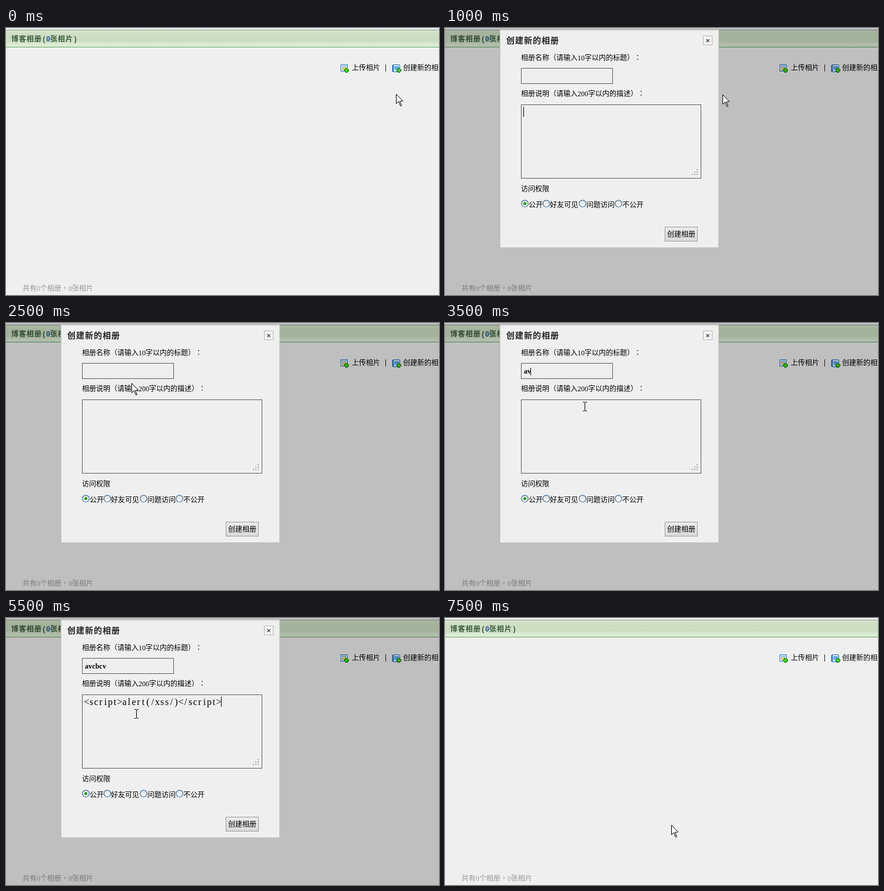
An HTML page with a canvas that plays this animation: 735x454 px, repeating every 8 s.

```html
<!DOCTYPE html>
<html lang="zh-CN">
<head>
<meta charset="utf-8">
<title>相册</title>
<style>
html, body { margin: 0; width: 100%; height: 100%; overflow: hidden; background: #efefef; }
canvas { display: block; }
</style>
</head>
<body>
<canvas id="stage" width="735" height="454"></canvas>
<script>
const ctx = document.getElementById('stage').getContext('2d');
const SONG = '"Liberation Serif", "Noto Sans CJK SC", "Noto Sans CJK", sans-serif';
const BOLD = '"Liberation Mono", "Noto Sans CJK SC", "Noto Sans CJK", sans-serif';
const MARK = '"Noto Sans CJK TC", "Noto Sans CJK", sans-serif';
const STEP = 500;
const CODE = '<script>alert(/xss/)<\/script>';

// One entry per half second.
const steps = [
  { cur: 'arrow', x: 662, y: 112 },
  { cur: 'hand', x: 680, y: 68, hover: true },
  { cur: 'arrow', x: 471, y: 113, name: '', caret: 'note' },
  { cur: 'beam', x: 185, y: 77, name: '' },
  { cur: 'beam', x: 184, y: 80, name: '', caret: 'name' },
  { cur: 'arrow', x: 213, y: 102, name: '' },
  { cur: 'arrow', x: 217, y: 101, name: 'a', caret: 'name' },
  { cur: 'beam', x: 234, y: 134, name: 'av', caret: 'name' },
  { cur: 'beam', x: 226, y: 134, name: 'avc', caret: 'name' },
  { cur: 'beam', x: 220, y: 140, name: 'avc' },
  { cur: 'beam', x: 218, y: 155, name: 'avcbcv', caret: 'name' },
  { cur: 'beam', x: 218, y: 155, name: 'avcbcv', note: CODE, caret: 'note' },
  { cur: 'arrow', x: 358, y: 314, name: 'avcbcv', note: CODE },
  { cur: 'arrow', x: 357, y: 335, name: 'avcbcv', note: CODE, caret: 'note' },
  { cur: 'hand', x: 379, y: 351, name: 'avcbcv', note: CODE, press: true },
  { cur: 'arrow', x: 384, y: 352 }
];

function rect(x, y, w, h, fill) {
  ctx.fillStyle = fill;
  ctx.fillRect(x, y, w, h);
}

function frame(x, y, w, h, color, dash = []) {
  ctx.strokeStyle = color;
  ctx.lineWidth = 1;
  ctx.setLineDash(dash);
  ctx.strokeRect(x + .5, y + .5, w - 1, h - 1);
  ctx.setLineDash([]);
}

function shade(y, h, stops) {
  const g = ctx.createLinearGradient(0, y, 0, y + h);
  stops.forEach((c, i) => g.addColorStop(i / (stops.length - 1), c));
  return g;
}

// Fixed-pitch text: wide characters take a full cell, Latin ones are centred in half a cell.
function text(str, x, cy, color = '#000', size = 12, cell = size, weight = '', family = SONG) {
  ctx.fillStyle = color;
  const base = Math.floor(cy + size * .38);
  for (const ch of str) {
    const wide = ch > '\u00ff';
    const w = wide ? cell : Math.ceil(cell / 2);
    // Traditional forms centre these marks in the cell.
    ctx.font = `${weight} ${size}px ${'，：'.includes(ch) ? MARK : family}`;
    ctx.fillText(ch, wide ? x : x + (w - ctx.measureText(ch).width) / 2, base);
    x += w;
  }
}

function poly(x, y, pts) {
  ctx.beginPath();
  for (let i = 0; i < pts.length; i += 2) ctx.lineTo(x + pts[i] + .5, y + pts[i + 1] + .5);
  ctx.closePath();
  ctx.fillStyle = '#fff';
  ctx.fill();
  ctx.strokeStyle = '#000';
  ctx.lineWidth = 1;
  ctx.stroke();
}

const cursors = {
  arrow(x, y) {
    poly(x, y, [0, 0, 0, 16, 4, 12.5, 7, 20, 9, 19.5, 6, 12, 11, 11.5]);
  },
  hand(x, y) {
    poly(x, y, [5, 13, 5, 1, 6, 0, 7, 0, 8, 1, 8, 5, 10, 5, 11, 6, 13, 6, 14, 7, 15, 7,
      16, 8, 16, 14, 14, 18, 14, 21, 5, 21, 5, 18, 1, 13, 0, 11, 1, 10, 2, 10]);
    for (const k of [8, 11, 14]) rect(x + k, y + 6, 1, 5, '#000');
  },
  beam(x, y) {
    rect(x + 3, y + 1, 1, 14, '#000');
    for (const dy of [0, 15]) {
      rect(x, y + dy, 3, 1, '#000');
      rect(x + 4, y + dy, 3, 1, '#000');
    }
  }
};

function plus(x, y) {
  rect(x + 2, y, 4, 8, '#0a7a0a');
  rect(x, y + 2, 8, 4, '#0a7a0a');
  rect(x + 3, y + 1, 2, 6, '#4fe01c');
  rect(x + 1, y + 3, 6, 2, '#4fe01c');
}

function uploadIcon() {
  rect(568, 62, 12, 12, '#1a6fc4');
  rect(569, 63, 10, 10, '#fff');
  rect(570, 64, 8, 8, shade(64, 8, ['#7fc0f2', '#b8dcf0', '#d9c25a']));
  rect(572, 66, 4, 4, '#f0c860');
  plus(574, 68);
}

function albumIcon() {
  ctx.fillStyle = '#1a62b8';
  ctx.beginPath();
  ctx.roundRect(656, 62, 13, 13, 2);
  ctx.fill();
  rect(658, 63, 10, 11, '#e6f3ff');
  rect(659, 65, 8, 7, shade(65, 7, ['#4a9ae6', '#8cc6f4']));
  for (let y = 64; y < 74; y += 3) rect(655, y, 3, 1, '#1a62b8');
  plus(663, 68);
}

function page(hover) {
  rect(0, 0, 735, 454, '#efefef');
  rect(0, 3, 735, 1, '#8f9296');
  rect(0, 4, 735, 1, '#dce8d5');
  rect(0, 5, 735, 11, shade(5, 11, ['#d3e3ca', '#c9dcbe']));
  rect(0, 16, 735, 1, '#d8e6d0');
  rect(0, 17, 735, 8, shade(17, 8, ['#c9dcbe', '#cfe2c6']));
  rect(0, 25, 735, 7, shade(25, 7, ['#d8e9d0', '#deeed8']));
  rect(0, 32, 735, 1, '#5fa85f');

  const head = (s, x, c) => text(s, x, 19, c, 12, 13, 'bold', BOLD);
  head('博客相册(', 9, '#3c5a3c');
  head('0', 68, '#2458a0');
  head('张相片)', 75, '#3c5a3c');

  uploadIcon();
  text('上传相片', 587, 68);
  rect(644, 62, 1, 12, '#222');
  albumIcon();
  text('创建新的相册', 674, 68, hover ? '#f60' : '#000');
  if (hover) {
    rect(674, 74, 61, 1, '#f60');
    frame(674, 61, 70, 15, '#777', [1, 1]);
  }
  text('共有0个相册，0张相片', 28, 443, '#999');
}

function radio(cx, cy, on) {
  ctx.beginPath();
  ctx.arc(cx, cy, 5.7, 0, 7);
  ctx.fillStyle = shade(cy - 6, 12, ['#dcdcd8', '#fff']);
  ctx.fill();
  ctx.strokeStyle = '#2d5f93';
  ctx.lineWidth = 1.1;
  ctx.stroke();
  if (!on) return;
  ctx.beginPath();
  ctx.arc(cx, cy, 2.6, 0, 7);
  ctx.fillStyle = '#22a322';
  ctx.fill();
}

function dialog(s) {
  rect(0, 0, 735, 454, 'rgba(0,0,0,.2)');
  frame(93, 3, 372, 371, '#c2c2c2');
  rect(94, 4, 370, 369, '#efefef');
  text('创建新的相册', 104, 21, '#222', 14, 15, 'bold', BOLD);

  rect(438, 13, 16, 16, '#f6f6f6');
  frame(438, 13, 16, 16, '#b4b4b4');
  ctx.strokeStyle = '#444';
  ctx.lineWidth = 1.4;
  ctx.beginPath();
  ctx.moveTo(443.5, 19); ctx.lineTo(448.5, 24);
  ctx.moveTo(448.5, 19); ctx.lineTo(443.5, 24);
  ctx.stroke();

  text('相册名称（请输入10字以内的标题）：', 129, 51);
  frame(129, 68, 156, 27, '#5c5c5c');
  text(s.name, 134, 82, '#000', 12, 12, 'bold');
  if (s.caret === 'name') rect(133 + s.name.length * 6, 76, 1, 13, '#000');

  text('相册说明（请输入200字以内的描述）：', 129, 112);
  frame(129, 130, 306, 126, '#5c5c5c');
  const note = s.note || '';
  text(note, 133, 142, '#000', 16);
  if (s.caret === 'note') rect(133 + note.length * 8, 134, 1, 17, '#000');
  for (let c = 0; c < 3; c++)
    for (let r = 2 - c; r < 3; r++) rect(419 + c * 4, 240 + r * 4, 2, 2, '#aaa');

  text('访问权限', 129, 274);
  [['公开', 135.5], ['好友可见', 172], ['问题访问', 233.5], ['不公开', 294.5]].forEach(([label, x], i) => {
    radio(x, 298.5, i === 0);
    text(label, Math.round(x + 6), 301);
  });

  rect(373, 338, 56, 25, shade(338, 25, ['#ececec', '#d9d9d9']));
  frame(373, 338, 56, 25, '#9c9c9c');
  if (s.press) frame(373, 338, 56, 25, '#000', [1, 1]);
  text('创建相册', 377, 351);
}

function draw(now) {
  const s = steps[Math.floor(now / STEP) % steps.length];
  page(s.hover);
  if (s.name !== undefined) dialog(s);
  cursors[s.cur](s.x, s.y);
}

const start = performance.now();
function tick() {
  draw(performance.now() - start);
  requestAnimationFrame(tick);
}
tick();
</script>
</body>
</html>
```
